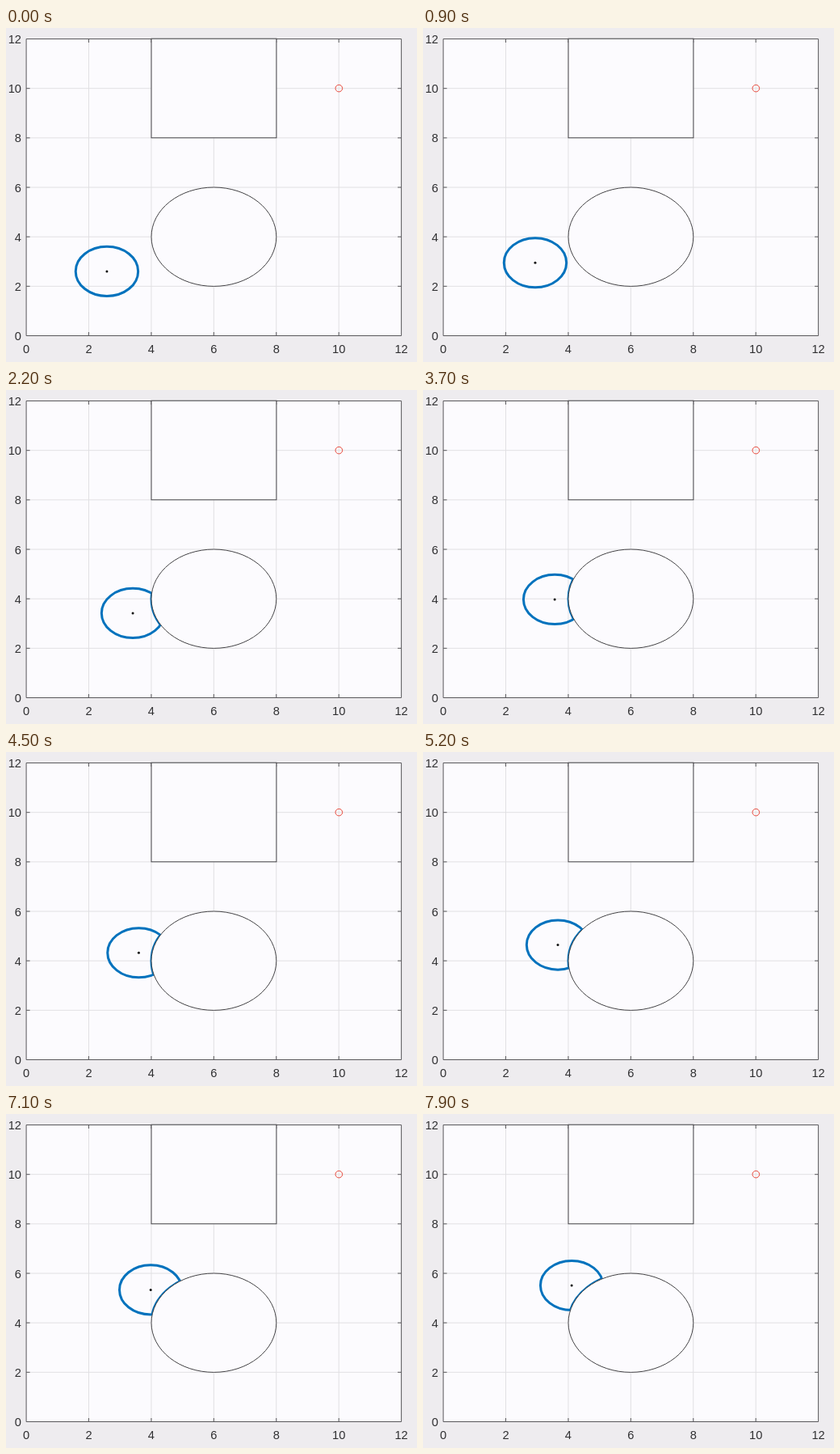
These frames come from a looping animation (509x413 px, 8000 ms). An HTML page:

```html
<!DOCTYPE html>
<html>
<head>
<meta charset="utf-8">
<style>
html, body { margin: 0; width: 100%; height: 100%; overflow: hidden; background: #eeecef; }
svg { display: block; }
text { font: 14.67px "Liberation Sans", Arial, sans-serif; fill: #303032; }
</style>
</head>
<body>
<svg width="509" height="413" viewBox="0 0 509 413" fill="none">
  <rect x="25" y="13.5" width="464.5" height="367" fill="#fcfbfe"/>
  <path id="grid" stroke="#e1e0e3"/>
  <path id="axes" stroke="#58575a"/>
  <g id="labels"></g>
  <clipPath id="inRange"><ellipse class="range" rx="38.7" ry="30.6"/></clipPath>
  <g stroke="#0072bd" stroke-width="3">
    <ellipse class="range" rx="38.7" ry="30.6"/>
    <ellipse cx="257.4" cy="258.2" rx="77.4" ry="61.2" clip-path="url(#inRange)"/>
  </g>
  <g fill="#fcfbfe" stroke="#444346">
    <rect x="180" y="13.2" width="154.9" height="122.6"/>
    <ellipse cx="257.4" cy="258.2" rx="77.4" ry="61.2"/>
  </g>
  <circle cx="412.3" cy="74.6" r="4.3" stroke="#e8493c"/>
  <circle class="range" r="1.5" fill="#111"/>
</svg>
<script>
// Plot units to pixels
const px = x => 25.1 + 38.71 * x;
const py = y => 380.5 - 30.58 * y;
const $ = id => document.getElementById(id);

const [left, right, top_, bottom] = [px(0), px(12), py(12), py(0)];
let grid = "", axes = `M${left} ${top_}H${right}V${bottom}H${left}Z`, labels = "";
for (let v = 0; v <= 12; v += 2) {
  const x = px(v), y = py(v);
  if (v > 0 && v < 12) {
    grid += `M${x} ${top_}V${bottom}M${left} ${y}H${right}`;
    axes += `M${x} ${bottom}v-4.5M${x} ${top_}v4.5M${left} ${y}h4.5M${right} ${y}h-4.5`;
  }
  labels += `<text x="${x}" y="402" text-anchor="middle">${v}</text>` +
    `<text x="19" y="${y + 5.5}" text-anchor="end">${v}</text>`;
}
$("grid").setAttribute("d", grid);
$("axes").setAttribute("d", axes);
$("labels").innerHTML = labels;

// The robot nears the round obstacle at (6, 4), then circles it at a fixed
// distance, turning fastest around step 49.
const rad = deg => deg * Math.PI / 180;
function robotAt(step) {
  const radius = 2.42 + 0.234 * Math.log(1 + Math.exp((24.5 - step) / 4.5));
  const s = step - 49;
  const angle = rad(12.1 + 0.73 * s + 5.3 * Math.sin(rad(4 * s)));
  return [6 - radius * Math.cos(angle), 4 + radius * Math.sin(angle)];
}

const robot = document.querySelectorAll(".range");
function draw(now) {
  const [x, y] = robotAt(Math.floor(now % 8000 / 100));
  for (const el of robot) {
    el.setAttribute("cx", px(x));
    el.setAttribute("cy", py(y));
  }
}

const start = performance.now();
function tick() {
  draw(performance.now() - start);
  requestAnimationFrame(tick);
}
tick();
</script>
</body>
</html>
```
